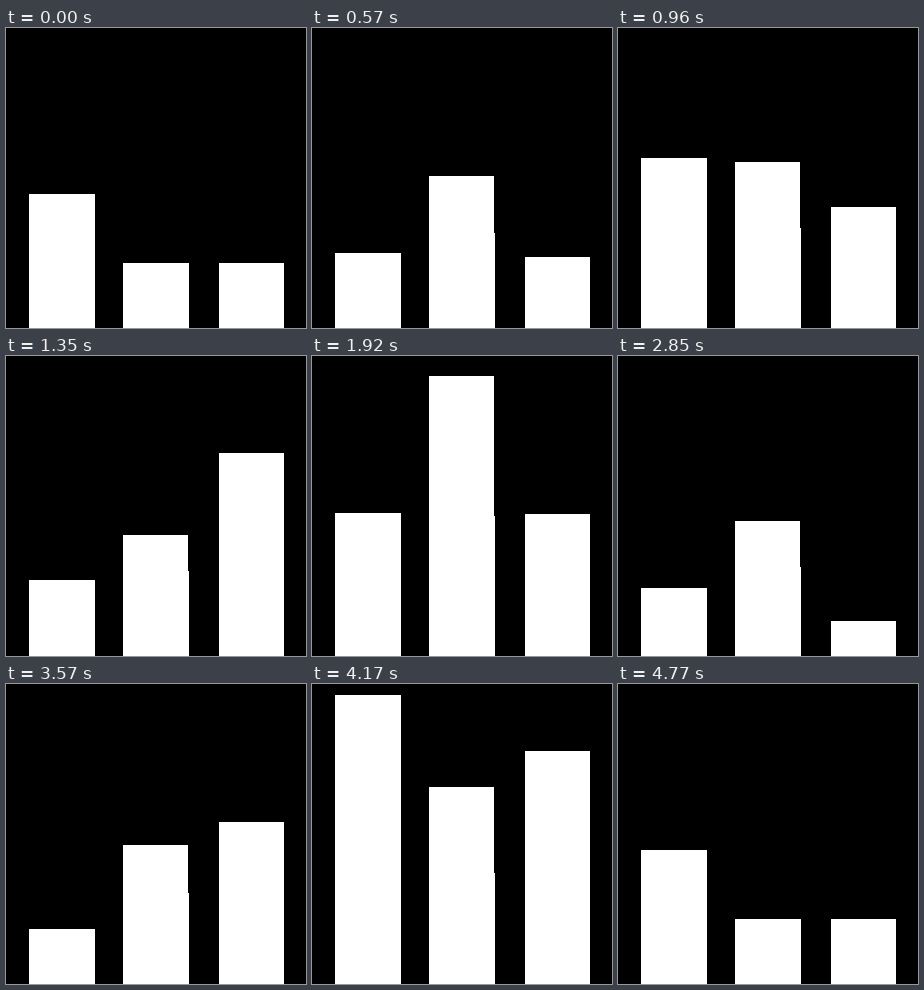
An HTML page with a canvas that plays this animation: 300 px wide and 300 px high, repeating every 4.83 s.

```html
<!DOCTYPE html>
<html>
<head>
<meta charset="utf-8">
<title>Equalizer</title>
<style>
  html, body { margin: 0; width: 100%; height: 100%; overflow: hidden; background: #000; }
  canvas { display: block; }
</style>
</head>
<body>
<canvas id="stage" width="300" height="300"></canvas>
<script>
const ctx = document.getElementById('stage').getContext('2d');
const LOOP = 4830, STEP = 30, END = 4770, REST = 235;

// Each key is [time in ms, y of the bar's top]; motion eases in and out between keys.
const bars = [
  { x: 23, width: 66, keys: [
    [0, 166], [250, 110], [600, 227], [950, 130], [1400, 227], [1570, 185], [1757, 235],
    [2165, 10], [2815, 235], [3000, 200], [3400, 273], [4200, 10], [4500, 235], [END, 166]] },
  { x: 117, width: 65, notched: true, keys: [
    [0, 235], [437, 10], [669, 235], [1000, 130], [1420, 183], [2012, 10], [2400, 235],
    [2960, 158], [3290, 235], [4010, 10], [4370, 235], [4560, 150], [END, 235]] },
  { x: 213, width: 65, keys: [
    [0, 235], [290, 90], [610, 234], [850, 140], [1100, 235], [1537, 10], [2173, 235],
    [2450, 130], [2785, 272], [3400, 10], [3712, 235], [4400, 10], [END, 235]] }
];

function topAt(keys, time) {
  const next = Math.max(1, keys.findIndex(([t]) => t >= time));
  const [t0, y0] = keys[next - 1], [t1, y1] = keys[next];
  const ease = (1 - Math.cos(Math.PI * (time - t0) / (t1 - t0))) / 2;
  return Math.round(y0 + (y1 - y0) * ease);
}

function fillDown(x, y, width) {
  ctx.fillRect(x, y, width, 300 - y);
}

function draw(now) {
  const time = Math.min(END, Math.floor(now % LOOP / STEP) * STEP);
  ctx.clearRect(0, 0, 300, 300);
  ctx.fillStyle = '#fff';
  for (const { x, width, notched, keys } of bars) {
    const y = topAt(keys, time);
    fillDown(x, y, width);
    // The middle bar's last pixel column starts lower than its top.
    if (notched) fillDown(x + width, Math.round(REST - (REST - y) * 0.35), 1);
  }
}

const start = performance.now();
function tick() {
  draw(performance.now() - start);
  requestAnimationFrame(tick);
}
tick();
</script>
</body>
</html>
```
